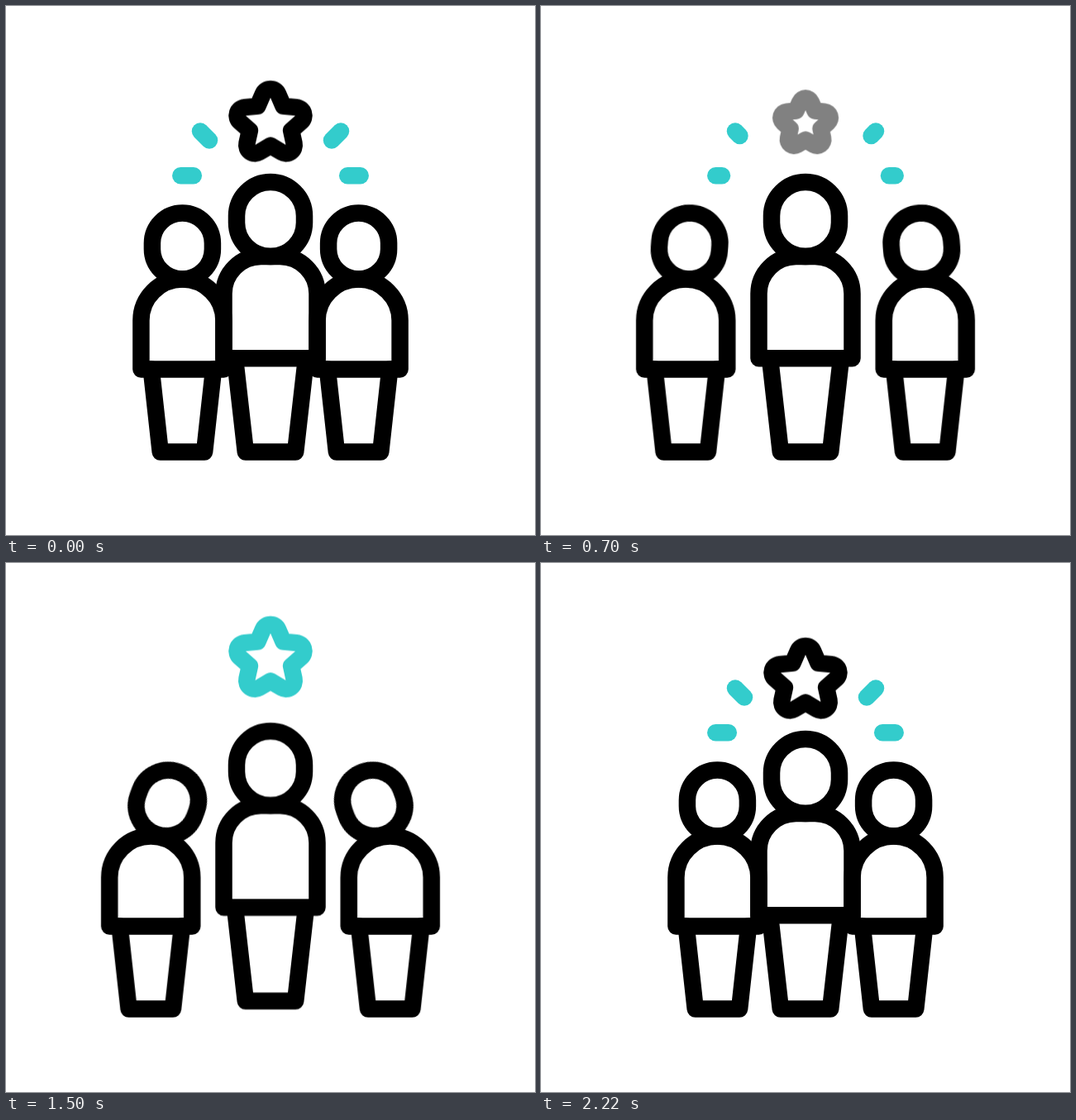
Animation of 640 by 640 pixels, one loop 2.4 s. Source, as an HTML page:

```html
<!DOCTYPE html>
<html lang="en">
<head>
<meta charset="utf-8">
<title>Team leader</title>
<style>
  html, body { margin: 0; height: 100%; overflow: hidden; background: #fff; }
  svg { display: block; width: 100vw; height: 100vh; }
  path {
    fill: none; stroke: #000; stroke-width: 20.5;
    stroke-linecap: round; stroke-linejoin: round;
  }
  .teal path, path.teal { stroke: #3cc; }

  .side, .head, .leader, .ray, .star {
    animation: 2400ms cubic-bezier(.37, 0, .63, 1) infinite both;
  }
  .side { animation-name: slide; }
  .head { animation-name: tilt; transform-origin: 213.4px 290.5px; }
  .leader { animation-name: rise; }
  .ray { animation-name: trim; animation-timing-function: linear; stroke-dasharray: 1 2; }
  .star {
    vector-effect: non-scaling-stroke;
    transform-origin: 0 0;
    animation-timing-function: cubic-bezier(.5, 0, .5, 1), linear;
  }
  .dark { animation-name: dark-size, dark-fade; }
  .bright { animation-name: bright-size, bright-fade; }

  @keyframes slide {
    0%, 9.17% { transform: translate(0, 0); }
    23.75%, 73.5% { transform: translate(-38.2px, 0); }
    75.83% { transform: translate(-38.2px, -.8px); }
    92.5%, 100% { transform: translate(0, 0); }
  }
  @keyframes tilt {
    0%, 21.46% { transform: translateX(0) rotate(0deg); }
    46.04%, 62.5% { transform: translateX(20px) rotate(20deg); }
    75.83% { transform: translateX(-14px) rotate(-14deg); }
    92.5%, 100% { transform: translateX(0) rotate(0deg); }
  }
  @keyframes rise {
    0%, 28.75% { transform: translateY(0); }
    47.5% { transform: translateY(-24px); }
    74.17%, 100% { transform: translateY(0); }
  }
  @keyframes trim {
    0%, 23.33% { stroke-dashoffset: 0; opacity: 1; }
    35% { stroke-dashoffset: 1; opacity: 1; }
    35.01%, 75.9% { stroke-dashoffset: 1; opacity: 0; }
    75.91% { stroke-dashoffset: 1; opacity: 1; }
    88.75%, 100% { stroke-dashoffset: 0; opacity: 1; }
  }
  @keyframes dark-size {
    0%, 23.33% { transform: scale(1); }
    35%, 75.9% { transform: scale(.48); }
    88.75%, 100% { transform: scale(1); }
  }
  @keyframes dark-fade {
    0%, 23.33% { opacity: 1; }
    35%, 75.9% { opacity: 0; }
    88.75%, 100% { opacity: 1; }
  }
  @keyframes bright-size {
    0%, 35% { transform: scale(.48); }
    47.5%, 64.17% { transform: scale(1); }
    75.83%, 100% { transform: scale(.48); }
  }
  @keyframes bright-fade {
    0%, 35% { opacity: 0; }
    47.5%, 64.17% { opacity: 1; }
    75.83%, 100% { opacity: 0; }
  }
</style>
</head>
<body>
<svg viewBox="0 0 640 640">
  <g class="half">
    <g class="side">
      <path class="head" d="M176.9 287a36.5 36.5 0 0 1 73 0v7a36.5 36.5 0 0 1-73 0z"/>
      <path d="M163.4 439.5v-59a50 50 0 0 1 100 0v59z"/>
      <path d="M175.7 439.5l11 100h53.4l11-100"/>
    </g>
    <g class="teal">
      <path class="ray" pathLength="1" d="M211.3 205.3H226.8"/>
      <path class="ray" pathLength="1" d="M235 151.6L246 162.6"/>
    </g>
  </g>

  <g class="leader">
    <path d="M279 254a41 41 0 0 1 82 0v8a41 41 0 0 1-82 0z"/>
    <path d="M263.5 426.3V348a45 45 0 0 1 45-45h23a45 45 0 0 1 45 45v78.3z"/>
    <path d="M277 426.3L289.8 539.5H350.2L363 426.3"/>
  </g>

  <g transform="translate(320 142.5)"><path class="star dark"/></g>
  <g transform="translate(320 116.5)"><path class="star bright teal"/></g>
</svg>
<script>
  // Five rounded tips, each turned a fifth of a circle.
  function starPath() {
    let d = "";
    for (let i = 0; i < 5; i++) {
      const a = i * Math.PI * 2 / 5, c = Math.cos(a), s = Math.sin(a);
      const turn = (x, y) => `${(x * c - y * s).toFixed(2)} ${(x * s + y * c).toFixed(2)}`;
      d += `${i ? "L" : "M"}${turn(-9.17, -36)}A10 10 0 0 1 ${turn(9.17, -36)}L${turn(15.5, -21.4)}`;
    }
    return d + "Z";
  }
  for (const star of document.querySelectorAll(".star")) star.setAttribute("d", starPath());

  // The right half is a mirrored copy of the left.
  const left = document.querySelector(".half"), right = left.cloneNode(true);
  right.setAttribute("transform", "matrix(-1 0 0 1 640 0)");
  left.after(right);
</script>
</body>
</html>
```
